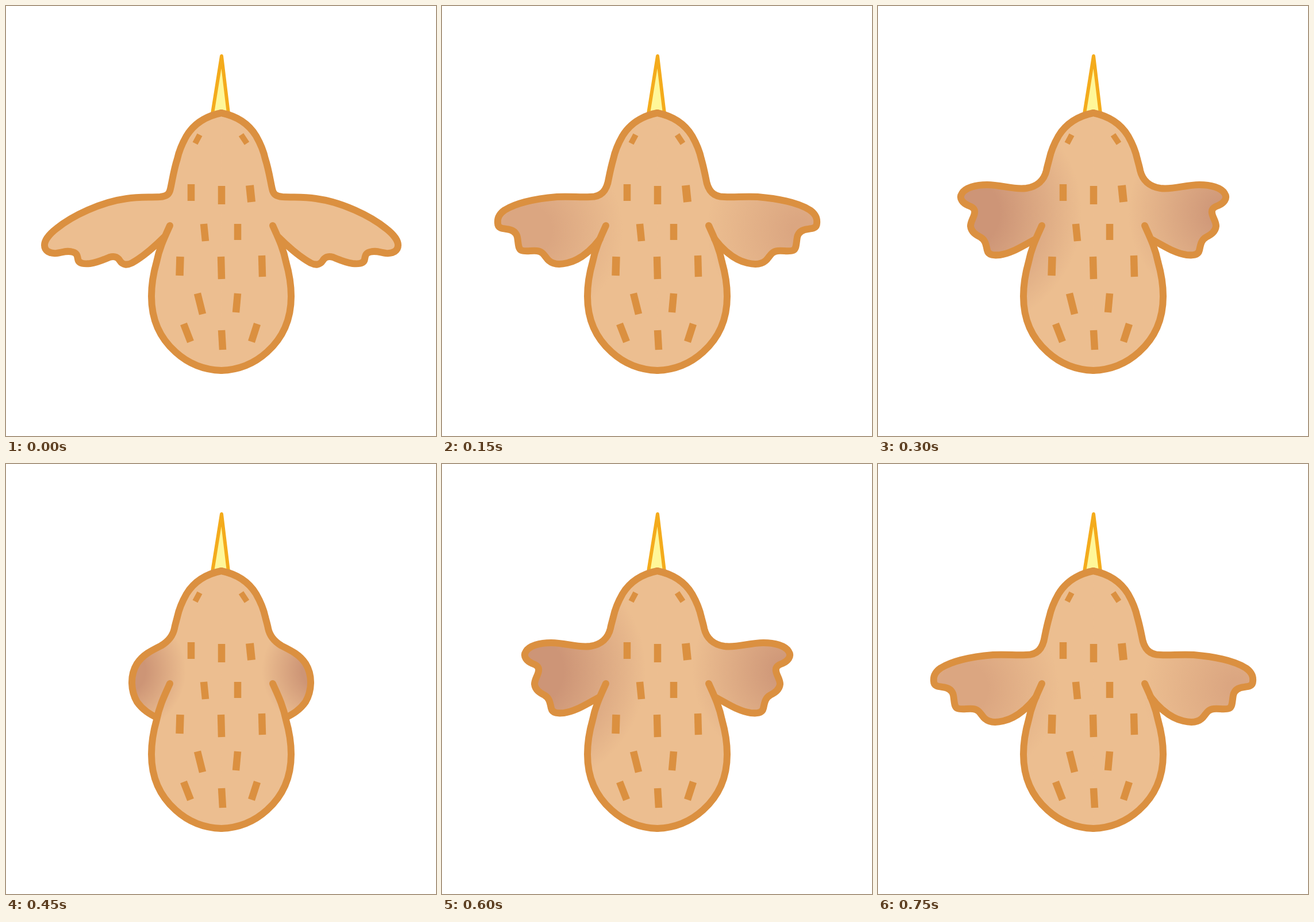
An HTML page for the animation above (900 ms loop, 748 px wide and 748 px high).

```html
<!DOCTYPE html>
<html lang="en">
<head>
<meta charset="utf-8">
<title>Flapping bird</title>
<style>
  html, body { margin: 0; width: 100%; height: 100%; overflow: hidden; background: #fff; }
  svg { display: block; width: 100%; height: 100%; }
  .line { fill: none; stroke: #db9040; stroke-width: 12; stroke-linecap: round; stroke-linejoin: round; }
  .dash { fill: none; stroke: #db9040; stroke-width: 12.5; }
  .pose { opacity: 0; animation: 900ms step-end infinite; }
  #spread  { animation-name: spread; }
  #lowered { animation-name: lowered; }
  #curled  { animation-name: curled; }
  #folded  { animation-name: folded; }
  @keyframes spread  { 0% { opacity: 1 } 16.666%, 100% { opacity: 0 } }
  @keyframes lowered { 0%, 33.333% { opacity: 0 } 16.666%, 83.333%, 100% { opacity: 1 } }
  @keyframes curled  { 0%, 50%, 83.333%, 100% { opacity: 0 } 33.333%, 66.666% { opacity: 1 } }
  @keyframes folded  { 0%, 66.666%, 100% { opacity: 0 } 50% { opacity: 1 } }
</style>
</head>
<body>
<svg id="stage" viewBox="0 0 748 748"></svg>
<script>
const SKIN = '#ecbe90';
const MIRROR = 'matrix(-1 0 0 1 749 0)';
const HEAD = 'M374.5 186C350 191 328 203 314 226C306 240 301 252 298 266';
const BELLY = 'C276 402 267 420 262 445C256 466 253 485 253 505C253 545 268 578 295 602C317 622 345 633 374.5 634';

// Left wing outlines; shade holds [cx, cy, r, solid part] for the left and the mirrored side.
const poses = {
  spread: {
    wing: `C292 284 289 305 286 318C284 328 279 331 268 332C245 333 230 332 210 335
      C165 341 115 365 88 387C75 397 67 408 67 416C67 426 76 431 88 430C100 428 108 425 116 428
      C124 430 124 435 125 440C126 448 136 449 146 448C160 446 170 441 180 437
      C190 434 195 438 198 443C203 451 211 451 219 447C237 437 258 419 275 402`,
    tint: SKIN,
    shade: [[100, 400, 100, 0], [100, 400, 100, 0]]
  },
  lowered: {
    wing: `C294 280 292 290 290 300C287 320 278 332 258 332C240 333 225 331 200 332
      C165 335 130 342 109 355C99 362 96 369 97 378C97 386 104 387 112 388
      C122 389 129 393 131 402C133 412 132 422 138 425C146 428 155 425 165 426
      C177 427 179 437 186 443C194 450 206 450 218 447C240 442 258 427 275 405`,
    tint: '#dba681',
    shade: [[150, 390, 165, .25], [124, 390, 165, .1]]
  },
  curled: {
    wing: `C296 274 294 280 293 286C289 303 277 314 258 317C235 320 215 311 190 311
      C170 311 152 316 146 326C140 335 148 343 157 347C165 350 169 353 168 360
      C167 368 161 374 161 383C162 393 170 398 178 402C187 407 188 416 190 425
      C192 434 202 434 212 433C233 430 250 418 273 406`,
    tint: '#cd9577',
    shade: [[150, 360, 205, .3], [149, 360, 165, .05]]
  },
  folded: {
    wing: `C296 274 294 280 293 286C290 300 280 310 270 316C252 325 238 332 228 347
      C215 368 217 395 228 414C238 428 250 435 262 441`,
    tint: '#cd9576',
    shade: [[205, 360, 108, .35], [204, 360, 100, .3]]
  }
};

// x1, y1, x2, y2, optional width
const dashes = [
  [337, 224, 329, 239, 10], [409, 224, 419, 239, 10],
  [322, 310, 322, 339], [375, 313, 375, 345], [424, 312, 427, 341, 14],
  [344, 379, 347, 409], [403, 379, 403, 407],
  [303, 436, 302, 469, 13.5], [374, 436, 375, 475], [445, 434, 446, 471],
  [333, 500, 342, 536], [403, 500, 400, 533],
  [309, 553, 321, 584], [375, 564, 377, 598], [437, 553, 427, 584]
];

const gradient = (id, [cx, cy, r, solid], tint) =>
  `<radialGradient id="${id}" gradientUnits="userSpaceOnUse" cx="${cx}" cy="${cy}" r="${r}">
    <stop offset="${solid}" stop-color="${tint}"/><stop offset="1" stop-color="${SKIN}"/>
  </radialGradient>`;

const half = (name, { wing, tint, shade }, side) => {
  const id = `${name}-shade-${side}`;
  return `<g ${side ? `transform="${MIRROR}"` : ''}>
    ${gradient(id, shade[side], tint)}
    <path d="${HEAD}${wing}L285 382${BELLY}Z" fill="url(#${id})"/>
    <path class="line" d="${HEAD}${wing}"/>
  </g>`;
};

const pose = ([name, shape]) =>
  `<g class="pose" id="${name}">${half(name, shape, 0)}${half(name, shape, 1)}</g>`;

const belly = `<path class="line" d="M285 382${BELLY}"/>`;

const dash = ([x1, y1, x2, y2, width]) =>
  `<path class="dash" d="M${x1} ${y1}L${x2} ${y2}" ${width ? `style="stroke-width:${width}"` : ''}/>`;

document.getElementById('stage').innerHTML = `
  <path d="M359 187L375 87L387 187" fill="#fff799" stroke="#f4ab1c" stroke-width="6" stroke-linejoin="round"/>
  <path d="M370 188h9v444h-9z" fill="${SKIN}"/>
  ${Object.entries(poses).map(pose).join('')}
  ${belly}<g transform="${MIRROR}">${belly}</g>
  ${dashes.map(dash).join('')}`;
</script>
</body>
</html>
```
